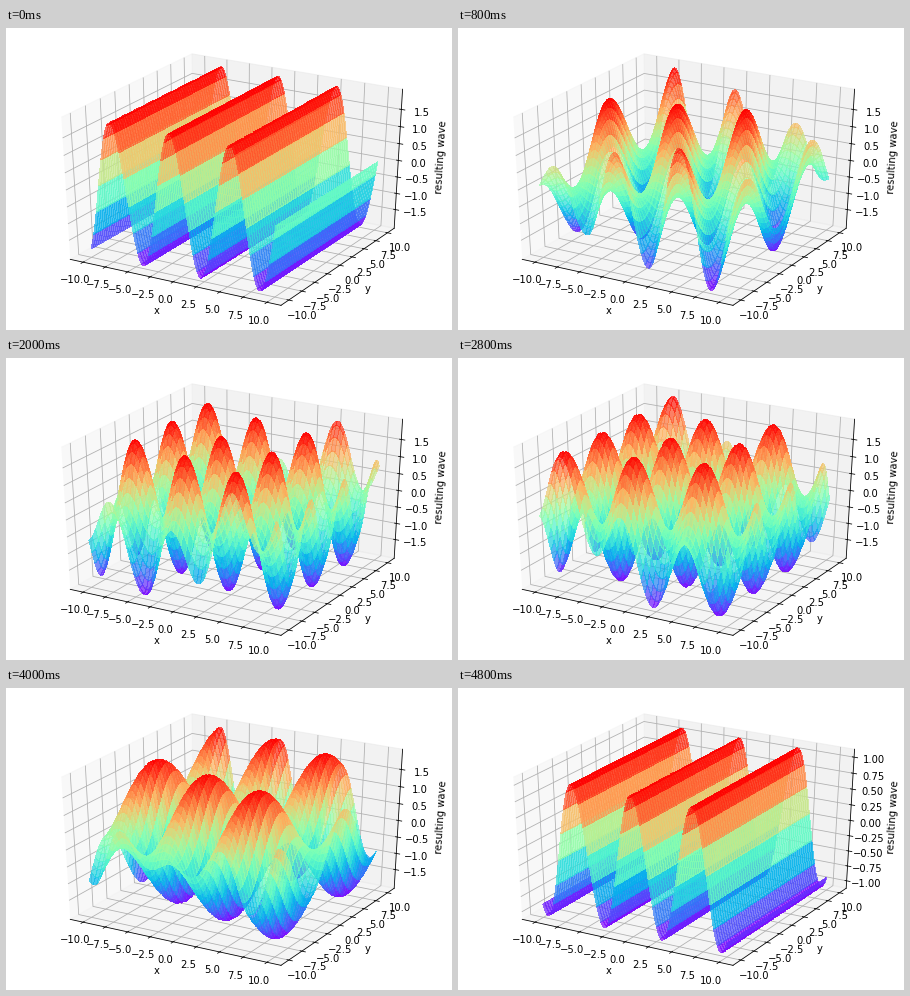
A matplotlib script that plays this animation: 446x302 px, repeating every 5.2 s.

```python
import numpy as np
import matplotlib.pyplot as plt
from matplotlib.animation import FuncAnimation

W, H, PAD, DPI = 446, 302, 7, 72
FRAMES, INTERVAL = 13, 400
GROW = 25 / 24          # panes reach a little past the data limits

plt.rcParams.update({"font.family": "DejaVu Sans", "font.size": 10})

fig = plt.figure(figsize=(W / DPI, H / DPI), dpi=DPI, facecolor="white")
ax = fig.add_axes([PAD / W, PAD / H, 1 - 2 * PAD / W, 1 - 2 * PAD / H],
                  projection="3d")
ax.apply_aspect = lambda position=None: None    # let the cube fill the stage
ax.set_box_aspect((1, 1, 1), zoom=np.sqrt(3) / 1.8294640721620434)
ax.view_init(elev=30, azim=-60)

ticks = np.arange(-10, 10.1, 2.5)
ax.set_xlim(-11 * GROW, 11 * GROW)
ax.set_ylim(-11 * GROW, 11 * GROW)
ax.set_xticks(ticks)
ax.set_yticks(ticks)
ax.set_xlabel("x")
ax.set_ylabel("y")
ax.set_zlabel("resulting wave")

side = np.linspace(-10, 10, 100)
X, Y = np.meshgrid(side, side)
surfaces = []


def wave(angle):
    """Plane wave of unit wavenumber travelling along the given angle."""
    return np.cos(X * np.cos(angle) + Y * np.sin(angle) + 1)


def clear():
    while surfaces:
        surfaces.pop().remove()


def update(i):
    clear()
    Z = wave(0) + wave(np.pi * i / (FRAMES - 1))
    surfaces.append(ax.plot_surface(X, Y, Z, cmap="rainbow", alpha=0.7,
                                    linewidth=0, antialiased=False))
    low, high = Z.min(), Z.max()
    mid, half = (low + high) / 2, (high - low) / 2 * GROW
    ax.set_zlim(mid - half, mid + half)
    if high > 1.5:
        ax.set_zticks(np.arange(-3, 4) * 0.5)
    else:
        ax.set_zticks(np.arange(-4, 5) * 0.25)
    ax.set_zlim(mid - half, mid + half)
    return surfaces


anim = FuncAnimation(fig, update, frames=FRAMES, init_func=lambda: update(0),
                     interval=INTERVAL, repeat=True, repeat_delay=0, blit=False)
plt.show()
```
